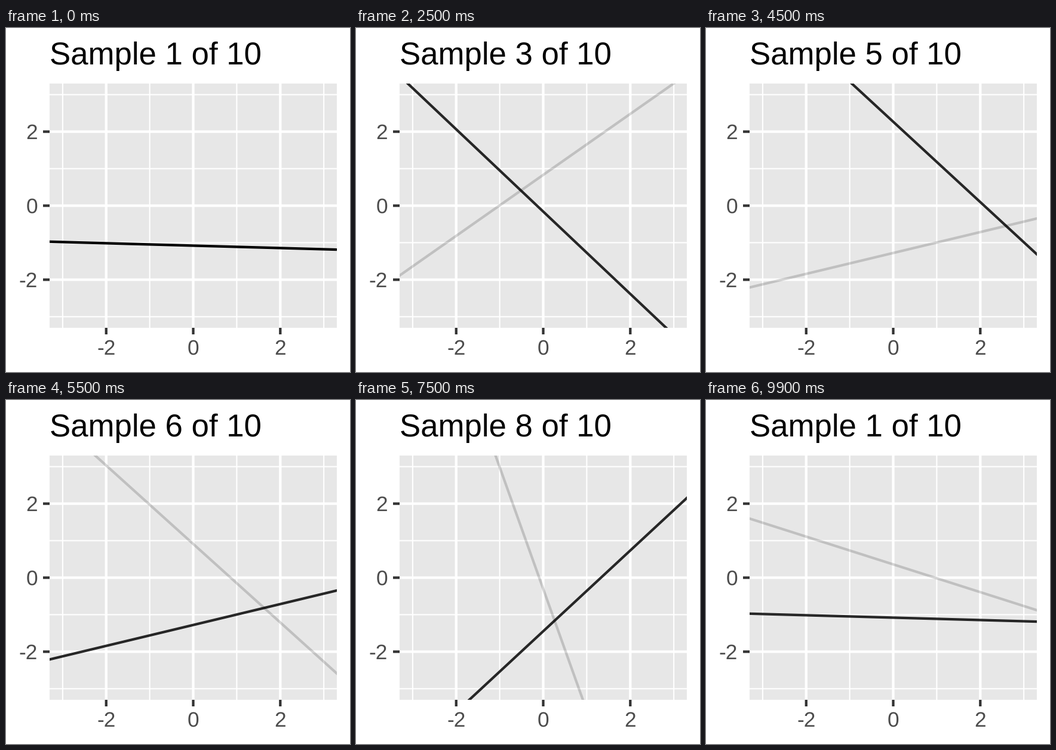
Recreate the animation shown at these times as a matplotlib script. Size 576x576 px, loop 10000 ms.

```python
import numpy as np
import matplotlib.pyplot as plt
from matplotlib.animation import FuncAnimation
from matplotlib.patches import Rectangle

plt.rcParams["font.family"] = "Liberation Sans"
plt.rcParams["text.hinting"] = "none"

SIZE, DPI = 576, 72                       # one point equals one pixel
LEFT, RIGHT, TOP, BOTTOM = 73, 554, 93, 502
LIMIT = 3.3
THICK, THIN = 4.27, 2.13
TITLE_SIZE, LABEL_SIZE = 52.8, 35.2
FRAMES, INTERVAL = 100, 100

# (intercept, slope) of each sampled line
SAMPLES = [
    (-1.080, -0.0325), (0.244, -1.4825), (-0.160, -1.112), (0.832, 0.824),
    (2.267, -1.085), (-1.278, 0.2823), (0.911, -1.0607), (-1.447, 1.091),
    (-0.304, -3.288), (0.359, -0.375),
]


def px(x):
    return (LEFT + RIGHT) / 2 + x * (RIGHT - LEFT) / (2 * LIMIT)


def py(y):
    return (TOP + BOTTOM) / 2 - y * (BOTTOM - TOP) / (2 * LIMIT)


fig = plt.figure(figsize=(SIZE / DPI, SIZE / DPI), dpi=DPI, facecolor="white")
ax = fig.add_axes([0, 0, 1, 1])
ax.set_xlim(0, SIZE)
ax.set_ylim(SIZE, 0)
ax.axis("off")


def stroke(xs, ys, color, width):
    line, = ax.plot(xs, ys, color=color, lw=width, solid_capstyle="butt",
                    snap=False)
    return line


def label(x, y, text, size, color):
    return ax.text(x, y, text, fontsize=size, color=color,
                   ha="left", va="baseline")


def label_width(text):
    return LABEL_SIZE * sum(0.333 if c == "-" else 0.556 for c in text)


def draw_panel():
    ax.add_patch(Rectangle((LEFT, TOP), RIGHT - LEFT, BOTTOM - TOP,
                           facecolor="#e7e7e7", edgecolor="none"))
    for values, width in (((-3, -1, 1, 3), THIN), ((-2, 0, 2), THICK)):
        for v in values:
            stroke([LEFT, RIGHT], [py(v)] * 2, "white", width)
            stroke([px(v)] * 2, [TOP, BOTTOM], "white", width)


def draw_axes():
    for v in (-2, 0, 2):
        text = str(v)
        width = label_width(text)
        stroke([LEFT - 11, LEFT], [py(v)] * 2, "#333333", THICK)
        stroke([px(v)] * 2, [BOTTOM, BOTTOM + 11], "#333333", THICK)
        label(53 - width, py(v) + 12.5, text, LABEL_SIZE, "#4d4d4d")
        label(px(v) - width / 2, 547, text, LABEL_SIZE, "#4d4d4d")


def sample_line(intercept, slope):
    x = np.array([-4, 4])
    line = stroke(px(x), py(intercept + slope * x), "black", THICK)
    line.set_clip_path(Rectangle((LEFT, TOP), RIGHT - LEFT, BOTTOM - TOP,
                                 transform=ax.transData))
    return line


draw_panel()
lines = [sample_line(*s) for s in SAMPLES]
draw_axes()
title = label(LEFT, 60.5, "", TITLE_SIZE, "black")


def update(frame):
    count = len(lines)
    old = max(frame - 1, 0) // 10
    new = (old + 1) % count
    steps = 7 if old == 0 else 6          # the first fade is one step longer
    t = min(max((frame - 10 * (old + 1) + steps) / steps, 0), 1)
    for line in lines:
        line.set_alpha(0)
    lines[old].set_alpha(1 - t)
    lines[new].set_alpha(t)
    nearest = new if t > 0.5 else old
    title.set_text(f"Sample {nearest + 1} of {count}")
    return [*lines, title]


anim = FuncAnimation(fig, update, frames=FRAMES, interval=INTERVAL,
                     repeat=True, repeat_delay=0)
plt.show()
```
